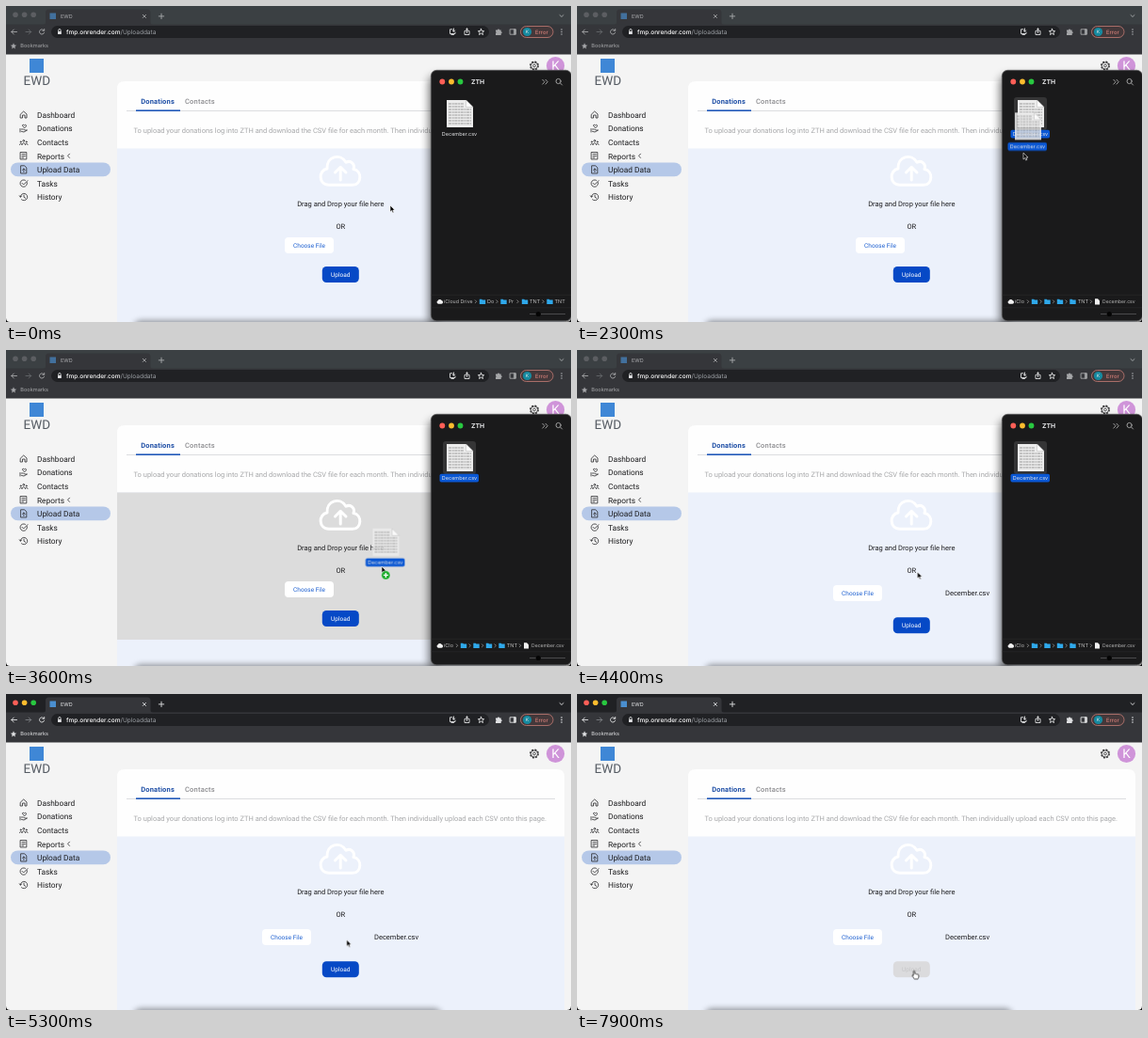
Animation, 600 px wide and 336 px high, one loop 8000 ms. Source, as an HTML page:

```html
<!DOCTYPE html>
<html lang="en">
<head>
<meta charset="utf-8">
<title>Upload data</title>
<style>
html, body { margin: 0; width: 100%; height: 100%; overflow: hidden; background: #0c0c0d; }
svg { display: block; }
#stage { width: 600px; height: 336px; }
text { font-family: Roboto, Arial, sans-serif; font-size: 7.5px; fill: #1c1c1e; text-rendering: geometricPrecision; }
.ui text { font-family: Inter, Roboto, sans-serif; font-size: 5.5px; fill: #e4e5e7; }
.mid { text-anchor: middle; }
.line { fill: none; stroke-linecap: round; stroke-linejoin: round; }
.menu text { font-size: 8.3px; }
.menu .line { stroke: #2a2a2c; stroke-width: .8; }
.tabs text { font-weight: 500; letter-spacing: .21px; }
.btn { font-size: 6.5px; }

/* one clock: 8 s, 1% = 80 ms */
.strip, .bright, .before, .picked, .drag, .over, .early, .late,
.finder, .arrow, .hand { animation: 8s step-end infinite; }
.cursor, .ghost, .send { animation: 8s linear infinite; }
.strip { animation-name: strip; }
.bright { animation-name: bright; }
.lights circle { animation: lights 8s step-end infinite; }
.before { animation-name: before; }
.picked { animation-name: picked; }
.drag { animation-name: drag; }
.over { animation-name: over; }
.early { animation-name: early; }
.late { animation-name: late; }
.finder { animation-name: finder; }
.arrow { animation-name: arrow; }
.hand { animation-name: hand; }
.cursor { animation-name: cursor; }
.ghost { animation-name: ghost; }
.send { animation-name: send; }
.send + text { animation: sendText 8s linear infinite; }

@keyframes strip { 0% { fill: #3b4043 } 58.75%, 100% { fill: #202124 } }
@keyframes bright { 0% { opacity: .66 } 58.75%, 100% { opacity: 1 } }
@keyframes lights { 0% { fill: #5c5e62 } 57.5%, 100% { fill: var(--on) } }
@keyframes before { 0% { opacity: 1 } 18.75%, 100% { opacity: 0 } }
@keyframes picked { 0% { opacity: 0 } 18.75%, 100% { opacity: 1 } }
@keyframes drag { 0% { opacity: 0 } 22.5% { opacity: 1 } 52.5%, 100% { opacity: 0 } }
@keyframes over { 0% { opacity: 0 } 33.75% { opacity: 1 } 52.5%, 100% { opacity: 0 } }
@keyframes early { 0% { opacity: 1 } 52.5%, 100% { opacity: 0 } }
@keyframes late { 0% { opacity: 0 } 52.5%, 100% { opacity: 1 } }
@keyframes finder { 0% { opacity: 1 } 57.5%, 100% { opacity: 0 } }
@keyframes arrow { 0% { opacity: 1 } 69.375%, 100% { opacity: 0 } }
@keyframes hand { 0% { opacity: 0 } 69.375%, 100% { opacity: 1 } }
@keyframes cursor {
  0%, 3.75% { transform: translate(408px, 212px); animation-timing-function: ease-in-out }
  15%, 22.5% { transform: translate(477px, 139px) }
  28.75% { transform: translate(474px, 156px) }
  32.5% { transform: translate(458px, 178px) }
  36.25% { transform: translate(428px, 206px) }
  45% { transform: translate(399px, 230px) }
  50%, 62.5% { transform: translate(361.5px, 236px); animation-timing-function: ease-in-out }
  70.5%, 82.5% { transform: translate(362px, 292.5px) }
  88%, 100% { transform: translate(358px, 294.5px) }
}
@keyframes ghost {
  0%, 22.5% { transform: none }
  28.75% { transform: translate(-3px, 13.3px) }
  32.5% { transform: translate(-14px, 31px) }
  36.25% { transform: translate(-39.2px, 57.7px) }
  45% { transform: translate(-78.5px, 89.7px) }
  50%, 100% { transform: translate(-116px, 96px) }
}
@keyframes send {
  0%, 69.375% { fill: #0649c6 }
  72.5%, 82.5% { fill: #87a5da }
  84.5%, 100% { fill: #dbdbdd }
}
@keyframes sendText {
  0%, 69.375% { fill: #fff }
  72.5%, 82.5% { fill: #e8eefa }
  84.5%, 100% { fill: #c6c6c8 }
}
</style>
</head>
<body>
<svg id="stage" viewBox="0 0 600 336" xmlns="http://www.w3.org/2000/svg">
  <defs>
    <filter id="soft" x="-30%" y="-30%" width="160%" height="160%"><feGaussianBlur stdDeviation="5"/></filter>
    <filter id="edge" x="-10%" y="-100%" width="120%" height="300%"><feGaussianBlur stdDeviation="3"/></filter>
    <g id="sheet">
      <path d="M468 100H488.500L496 107.500V129H468Z" fill="#ececec"/>
      <path d="M470 104H486M470 107H486M470 110H494M470 113H494M470 116H494M470 119H494M470 122H494M470 125H494" stroke="#b4b4b4" stroke-width="1.600" stroke-dasharray="3.200 .7 1.800 .6"/>
      <path d="M488.500 100V107.500H496Z" fill="#fff" stroke="#b5b5b5" stroke-width=".5"/>
    </g>
    <g id="tag" class="ui">
      <rect x="460.500" y="131.800" width="41.500" height="8.700" rx="1.700" fill="#0a57d3"/>
      <text class="mid" x="481.500" y="138.200">December.csv</text>
    </g>
    <path id="folder" d="M-3.200-2.500H-.8L0-1.700H3.200V2.600H-3.200Z" fill="#2fa8ea"/>
    <path id="next" class="line" d="M-.8-1.500L.7 0-.8 1.500" stroke="#999" stroke-width=".8"/>
    <path id="cloud" d="M459 316.800A1.900 1.900 0 0 1 458.700 313.200A2.300 2.300 0 0 1 462.600 312.900A2 2 0 0 1 462.400 316.800Z" fill="#f2f2f2"/>
  </defs>

  <!-- page -->
  <path d="M0 40H600V331.500Q600 336 595.500 336H4.500Q0 336 0 331.500Z" fill="#f4f4f4"/>
  <rect x="25" y="56" width="15" height="15" fill="#3f87d6"/>
  <text x="18.500" y="84" style="font-size:13.5px;fill:#555b63">EWD</text>

  <rect x="5" y="166.400" width="106" height="14.800" rx="7.400" fill="#b5c8e8"/>
  <g class="menu">
    <text x="33" y="118.500">Dashboard</text>
    <text x="33" y="133.200">Donations</text>
    <text x="33" y="147.800">Contacts</text>
    <text x="33" y="162.500">Reports</text>
    <text x="33" y="177.100">Upload Data</text>
    <text x="33" y="191.800">Tasks</text>
    <text x="33" y="206.400">History</text>
    <g class="line">
      <path d="M15.500 115L18.700 112 22 115V119H20V116H17.500V119H15.500Z"/>
      <path d="M15 130.500V134M16.500 131H18.500L20 132H22.500L19 134 16.500 133.400M19.500 129.500L17.500 127.500C17 126 19 126 19.500 127 20 126 22 126 21.500 127.500Z"/>
      <path d="M14.500 147.500C14.500 145.700 17 145.700 17 147.500M17 147.300C17 145.200 20.500 145.200 20.500 147.300M20.500 147.500C20.500 145.700 23 145.700 23 147.500"/>
      <circle cx="18.700" cy="143.300" r=".9"/><circle cx="15.700" cy="144.400" r=".5"/><circle cx="21.700" cy="144.400" r=".5"/>
      <path d="M15.500 155.500H21.800V163H15.500ZM17 157.500H20.300M17 159.500H20.300M17 161.300H18.500"/>
      <path d="M16 169.800H19.700L21.800 172V178H16ZM18.900 176.500V173M17.500 174.300L18.900 173 20.300 174.300"/>
      <path d="M22.300 187.500A3.700 3.700 0 1 1 20.500 185.300M17 188.300L18.700 190 23 185.600"/>
      <path d="M15.300 203A3.700 3.700 0 1 1 16.500 205.800M14.300 201.800L15.300 203.200 16.700 202M19 201V203.300L20.700 204.300"/>
      <path d="M67.500 157.200L65.500 159.300 67.500 161.400"/>
    </g>
  </g>

  <path d="M118 152V88Q118 80 126 80H585Q593 80 593 88V152Z" fill="#fefefe"/>
  <rect x="118" y="151.500" width="475" height="185" fill="#ecf1fb"/>
  <rect class="over" x="118" y="151.500" width="475" height="156.500" fill="#dcdcdc"/>
  <path d="M128 111.500H583" stroke="#d9dadd" stroke-width=".9"/>
  <rect x="138" y="110.400" width="47" height="1.600" fill="#1f57b8"/>
  <g class="tabs">
    <text x="143.300" y="104.300" style="fill:#1f4fa6;font-weight:700;letter-spacing:.16px">Donations</text>
    <text x="190" y="104.300" style="fill:#8c8c8f">Contacts</text>
  </g>
  <text x="135.500" y="134.500" style="fill:#a6a7a9">To upload your donations log into ZTH and download the CSV file for each month. Then individually upload each CSV onto this page.</text>

  <g class="line" stroke="#fff" stroke-width="3">
    <path d="M343 190.300C331.500 190.300 331.500 174.500 341 173C340 160 355 156 361 166.300C366 163.500 371 168 369 173.500C378.500 175 378 190.300 368 190.300Z"/>
    <path d="M355.200 185V171.500M349.500 177L355.200 171.300 361 177"/>
  </g>
  <text class="mid" x="355.300" y="213.200">Drag and Drop your file here</text>
  <text class="mid" x="355.300" y="237.200">OR</text>

  <g class="early">
    <rect x="296" y="246" width="52" height="17" rx="4" fill="#fff"/>
    <text class="btn mid" x="322" y="257" style="fill:#1c5fd0">Choose File</text>
    <rect x="335.800" y="277" width="39" height="17" rx="4.500" fill="#0649c6"/>
    <text class="btn mid" x="355.300" y="287.800" style="fill:#fff">Upload</text>
  </g>
  <g class="late">
    <rect x="272" y="250" width="52" height="17" rx="4" fill="#fff"/>
    <text class="btn mid" x="298" y="260.800" style="fill:#1c5fd0">Choose File</text>
    <text x="391" y="261">December.csv</text>
    <rect class="send" x="335.800" y="284.200" width="39" height="17" rx="4.500"/>
    <text class="btn mid" x="355.300" y="295.100">Upload</text>
  </g>

  <circle cx="561" cy="63.500" r="4.300" fill="none" stroke="#2b2b2d" stroke-width="1.300" stroke-dasharray="1.900 1.477"/>
  <circle cx="561" cy="63.500" r="3.600" fill="none" stroke="#2b2b2d" stroke-width=".8"/>
  <circle cx="561" cy="63.500" r="1.400" fill="none" stroke="#2b2b2d" stroke-width=".8"/>
  <circle cx="583.500" cy="63.500" r="9.600" fill="#cf94d9"/>
  <text class="mid" x="583.500" y="68.300" style="font-size:13.5px;fill:#fff">K</text>
  <rect x="136" y="334.500" width="326" height="14" rx="7" fill="#000" opacity=".4" filter="url(#edge)"/>

  <!-- browser -->
  <g class="ui">
    <rect class="strip" width="600" height="21"/>
    <path d="M39 20Q42 20 42 17V7Q42 3.500 45.500 3.500H150Q153.500 3.500 153.500 7V17Q153.500 20 156.500 20Z" fill="#35363a"/>
    <rect y="19.500" width="600" height="32" fill="#35363a"/>
    <rect x="48" y="21" width="465" height="13" rx="6.500" fill="#202124"/>
    <g class="lights">
      <circle cx="10" cy="9.300" r="2.800" style="--on:#fe5f57"/>
      <circle cx="19.600" cy="9.300" r="2.800" style="--on:#febc2e"/>
      <circle cx="29.200" cy="9.300" r="2.800" style="--on:#28c840"/>
    </g>
    <text x="64" y="29.900" style="font-size:6.5px;font-weight:500;fill:#fff">fmp.onrender.com<tspan fill="#9da1a6" font-weight="400">/Uploaddata</tspan></text>
    <g class="line" stroke="#e0e1e3" stroke-width=".9">
      <path d="M55.700 27V25.700A1.200 1.200 0 0 1 58.100 25.700V27"/>
      <path d="M474 24.800H471.500V29.500H477V28M473 30.500H475.500M475.500 24V27M474.300 26L475.500 27.200 476.700 26"/>
      <path d="M488.200 26.500H487V30.500H492V26.500H490.800M489.500 28.500V24M488.200 25.200L489.500 24 490.800 25.200"/>
      <path id="star" d="M504.500 24.300L505.400 26.500 507.700 26.700 505.900 28.200 506.500 30.500 504.500 29.200 502.500 30.500 503.100 28.200 501.300 26.700 503.600 26.500Z"/>
    </g>
    <rect x="55" y="27" width="3.800" height="3" rx=".5" fill="#e0e1e3"/>
    <g class="bright">
      <rect x="46.500" y="7.500" width="6.500" height="6.500" fill="#4a8fd0"/>
      <text x="58" y="12.800">EWD</text>
      <text x="15.300" y="44.400" style="font-size:5.6px">Bookmarks</text>
      <g class="line" stroke="#e0e1e3" stroke-width=".9">
        <path d="M145.300 9.300L148.500 12.500M148.500 9.300L145.300 12.500M162.300 10.900H167.700M165 8.200V13.600M588 9.600L590 11.500 592 9.600"/>
        <path d="M11.500 27.500H5.800M8.300 25L5.800 27.500 8.300 30"/>
        <path d="M21 27.500H26.700M24.200 25L26.700 27.500 24.200 30" stroke="#7d8084"/>
        <path d="M40.300 26A2.600 2.600 0 1 0 40.600 28.300M40.700 24.500V26.300H38.900"/>
        <path d="M535.500 24.800H541.500V30.200H535.500ZM539.500 24.800V30.200M540.500 24.800V30.200"/>
      </g>
      <use href="#star" transform="translate(-496.500 15)" fill="#e0e1e3"/>
      <path d="M520 25.500H522A1 1 0 0 1 524 25.500H525.700V27.200A1 1 0 0 1 525.700 29.200V31H520V29A1 1 0 0 0 520 27.200Z" fill="#e0e1e3"/>
      <g fill="#e0e1e3"><circle cx="590" cy="25" r=".8"/><circle cx="590" cy="27.500" r=".8"/><circle cx="590" cy="30" r=".8"/></g>
    </g>
    <rect x="546.500" y="21.500" width="34.500" height="12" rx="6" fill="#44383a" stroke="#d9877f" stroke-width=".7"/>
    <circle cx="553.500" cy="27.500" r="4.600" fill="#168aa0"/>
    <text class="mid" x="553.500" y="29.400" style="font-size:5px">K</text>
    <text x="562" y="29.600" style="font-size:5.9px;fill:#f08d84">Error</text>
  </g>

  <!-- file window -->
  <g class="finder ui">
    <rect x="449" y="74" width="153" height="266" rx="8" fill="#000" opacity=".55" filter="url(#soft)"/>
    <rect x="451.300" y="68.300" width="149.200" height="266.500" rx="6" fill="#1a1a1b" stroke="#59595b" stroke-width=".7"/>
    <circle cx="463.300" cy="80.500" r="2.900" fill="#fe5f57"/>
    <circle cx="473" cy="80.500" r="2.900" fill="#febc2e"/>
    <circle cx="482.500" cy="80.500" r="2.900" fill="#28c840"/>
    <text x="494" y="83" style="font-size:6.8px;font-weight:700">ZTH</text>
    <g class="line" stroke="#aaa" stroke-width=".9">
      <path d="M569.800 78.300L572 80.700 569.800 83.100M573 78.300L575.200 80.700 573 83.100M588.600 82L590.500 84"/>
      <circle cx="586.600" cy="80" r="2.600"/>
    </g>
    <rect class="picked" x="464" y="97" width="35" height="35" rx="3" fill="#353536"/>
    <use href="#sheet"/>
    <text class="mid before" x="481.500" y="138.200">December.csv</text>
    <use class="picked" href="#tag"/>
    <path d="M451.700 307.300H600M451.700 320.800H600" stroke="#2b2b2d" stroke-width=".6"/>
    <use href="#cloud"/>
    <g class="before">
      <text x="465" y="316.300" style="font-size:5.3px;fill:#bbb">iCloud Drive</text>
      <use href="#next" x="499" y="314.300"/><use href="#folder" x="506" y="314.300"/>
      <text x="511" y="316.300" style="fill:#bbb">Do</text>
      <use href="#next" x="521.500" y="314.300"/><use href="#folder" x="528.500" y="314.300"/>
      <text x="533.500" y="316.300" style="fill:#bbb">Pr</text>
      <use href="#next" x="543.500" y="314.300"/><use href="#folder" x="551" y="314.300"/>
      <text x="556" y="316.300" style="fill:#bbb">TNT</text>
      <use href="#next" x="570.500" y="314.300"/><use href="#folder" x="577.500" y="314.300"/>
      <text x="582.500" y="316.300" style="fill:#bbb">TNT</text>
    </g>
    <g class="picked">
      <text x="465" y="316.300" style="fill:#bbb">iClo</text>
      <use href="#next" x="479" y="314.300"/><use href="#folder" x="486" y="314.300"/>
      <use href="#next" x="492.700" y="314.300"/><use href="#folder" x="499.500" y="314.300"/>
      <use href="#next" x="506.200" y="314.300"/><use href="#folder" x="513" y="314.300"/>
      <use href="#next" x="519.700" y="314.300"/><use href="#folder" x="526.500" y="314.300"/>
      <text x="531.700" y="316.300" style="fill:#bbb">TNT</text>
      <use href="#next" x="546" y="314.300"/>
      <path d="M550 311.300H553L555 313.300V317.500H550Z" fill="#f0f0f0"/>
      <text x="558" y="316.300" style="font-size:5.1px;fill:#bbb">December.csv</text>
    </g>
    <path d="M556 327.500H594" stroke="#4b4b4d" stroke-width="1.200"/>
    <circle cx="565.300" cy="327.500" r="2.600" fill="#050505"/>
  </g>

  <!-- dragged copy and pointer -->
  <g class="drag"><g class="ghost">
    <use href="#sheet" opacity=".85"/>
    <use href="#tag"/>
  </g></g>
  <g class="cursor">
    <path class="arrow" d="M0 0V6.900L1.600 5.400 2.700 7.900 3.900 7.400 2.800 5H5Z" fill="#050505" stroke="#fff" stroke-width=".6"/>
    <g class="over">
      <circle cx="4.400" cy="9.400" r="4.600" fill="#1dac2b" stroke="#e8f5e8" stroke-width=".4"/>
      <path d="M1.900 9.400H6.900M4.400 6.900V11.900" stroke="#fff" stroke-width="1.400"/>
    </g>
    <path class="hand" d="M-.8 5V.6C-.8-.5.8-.5.8.6V3.200C1.100 2.600 2.200 2.700 2.300 3.500C2.700 3 3.600 3.200 3.700 3.900C4.200 3.600 4.900 3.900 4.900 4.600V6.200C4.900 7.500 4.200 7.900 4 8.600H.3C0 7.400-1.400 6.600-2.100 5.200C-2.300 4.300-1.400 4.200-.8 5Z" fill="#fff" stroke="#111" stroke-width=".7"/>
  </g>
</svg>
</body>
</html>
```
